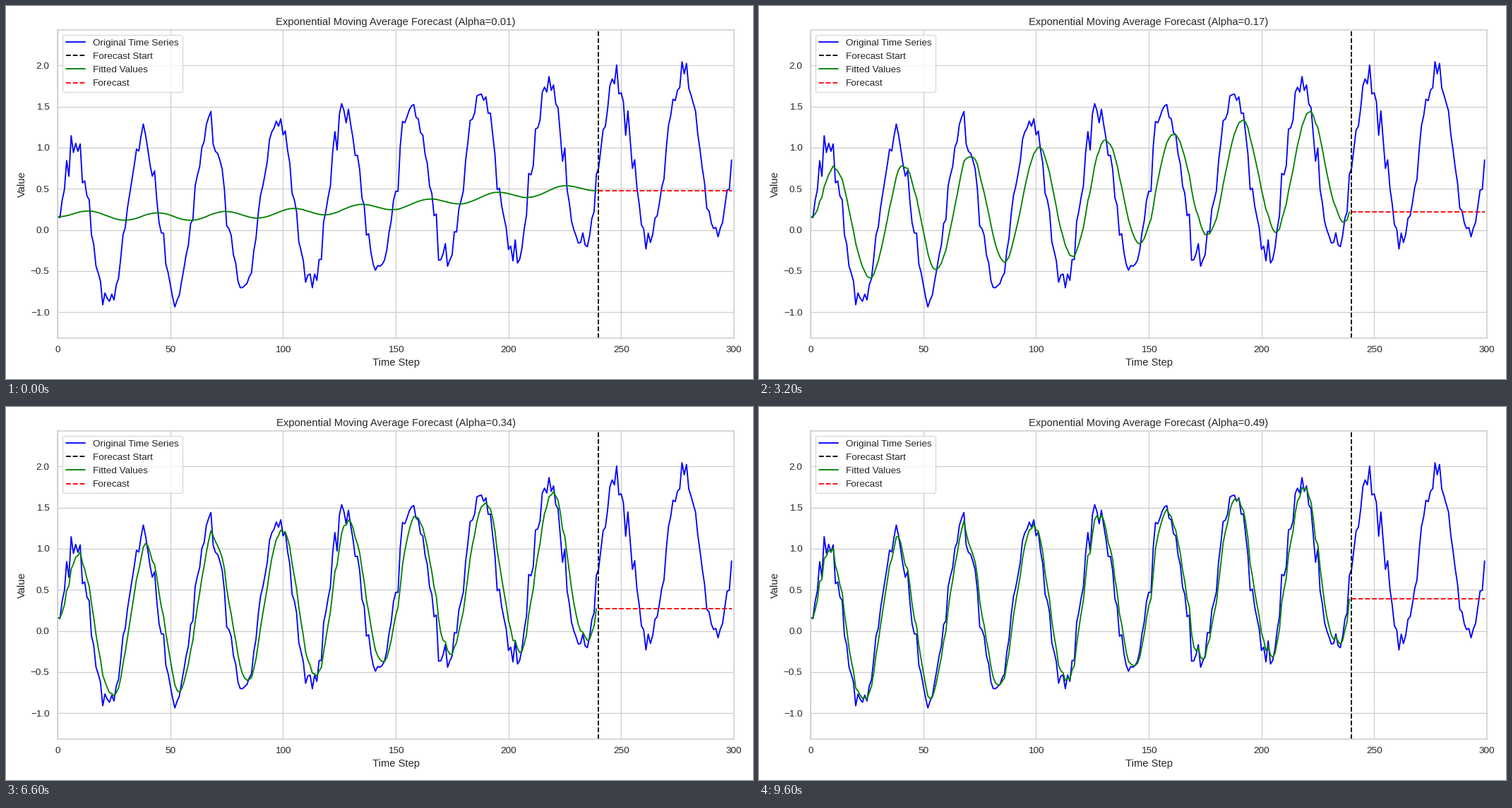
A matplotlib script that plays this animation: 1058x529 px, repeating every 9800 ms.

```python
import numpy as np
import matplotlib.pyplot as plt
from matplotlib.animation import FuncAnimation

WIDTH, HEIGHT = 1058, 529
STEPS, SPLIT = 300, 240
FRAMES, INTERVAL = 49, 200
DARK, LIGHT = "0.15", "0.8"

plt.rcParams.update({
    "font.family": "Liberation Sans",
    "font.size": 12,
    "text.color": DARK,
    "axes.titlesize": 12,
    "axes.labelsize": 12,
    "axes.labelcolor": DARK,
    "axes.edgecolor": LIGHT,
    "axes.linewidth": 1.25,
    "axes.axisbelow": True,
    "axes.grid": True,
    "grid.color": LIGHT,
    "grid.linewidth": 1,
    "legend.fontsize": 11,
    "lines.linewidth": 1.5,
    "lines.solid_capstyle": "round",
})
for axis in ("xtick", "ytick"):
    plt.rcParams.update({
        f"{axis}.labelsize": 11,
        f"{axis}.color": DARK,
        f"{axis}.major.size": 6,
    })
plt.rcParams.update({"xtick.bottom": False, "ytick.left": False})


def make_series():
    """Rising trend with a 30-step season and Gaussian noise."""
    np.random.seed(1)
    t = np.arange(STEPS)
    noise = np.random.normal(0, 0.1, STEPS)
    return t, np.linspace(0, 1, STEPS) + np.sin(2 * np.pi * t / 30) + noise


def smooth(values, alpha):
    """Exponential moving average seeded with the first value."""
    level = values[0]
    fitted = [level]
    for value in values[1:]:
        level = alpha * value + (1 - alpha) * level
        fitted.append(level)
    return fitted


time, series = make_series()

fig, ax = plt.subplots(figsize=(12, 6), dpi=WIDTH / 12)
ax.plot(time, series, color="blue", label="Original Time Series")
ax.axvline(SPLIT, color="black", linestyle="--", label="Forecast Start")
fitted_line, = ax.plot([], [], color="green", label="Fitted Values")
forecast_line, = ax.plot([], [], color="red", linestyle="--", label="Forecast")

ax.set_xlim(0, STEPS)
ax.set_ylim(-1.311, 2.429)
ax.set_xlabel("Time Step")
ax.set_ylabel("Value")
title = ax.set_title("Exponential Moving Average Forecast (Alpha=0.01)")
ax.legend(loc="upper left")
fig.tight_layout()


def update(frame):
    alpha = round(0.01 * (frame + 1), 2)
    fitted = smooth(series[:SPLIT], alpha)
    fitted_line.set_data(time[:SPLIT], fitted)
    forecast_line.set_data(time[SPLIT:], np.full(STEPS - SPLIT, fitted[-1]))
    title.set_text(f"Exponential Moving Average Forecast (Alpha={alpha})")
    return fitted_line, forecast_line, title


animation = FuncAnimation(fig, update, frames=FRAMES, interval=INTERVAL,
                          repeat=True, repeat_delay=0)
plt.show()
```
